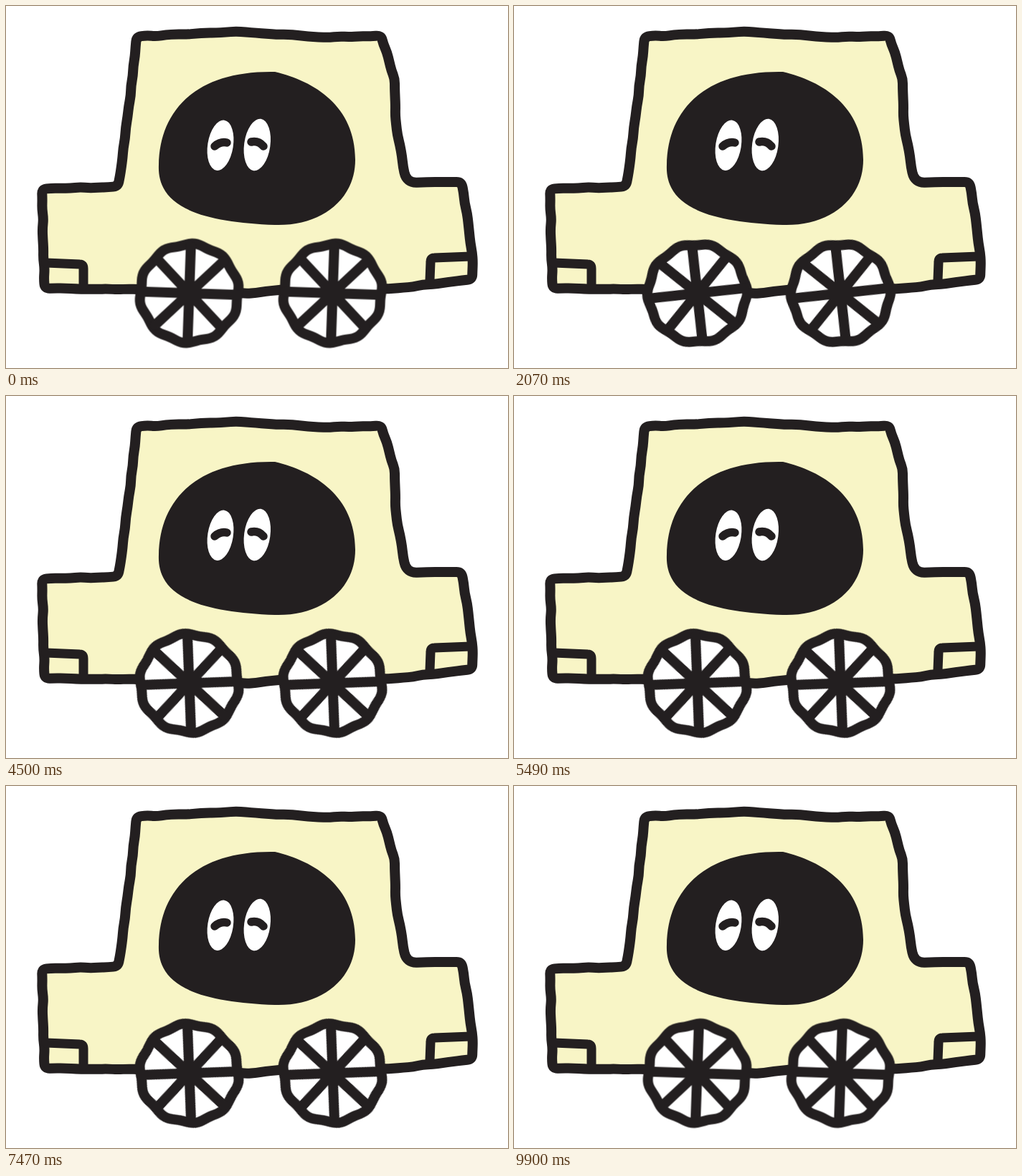
An HTML page that plays this animation: 700x506 px, repeating every 9990 ms.

```html
<!DOCTYPE html>
<html lang="en">
<head>
<meta charset="utf-8">
<title>Little car</title>
<style>
  html, body { margin: 0; width: 100%; height: 100%; overflow: hidden; background: #fff; }
  svg { display: block; width: 700px; height: 506px; }
  .line { fill: none; stroke: #231f20; stroke-width: 14; stroke-linecap: round; stroke-linejoin: round; }
  .thin { stroke-width: 13; }
  .lid { stroke-width: 11.5; }
  .body { fill: #f8f5c6; }
  .dark { fill: #231f20; }
  .white { fill: #fff; }
</style>
</head>
<body>
<svg viewBox="0 0 700 506">
  <defs>
    <g id="wheel">
      <path id="rim" class="line white"/>
      <path id="spokes" class="line"/>
    </g>
  </defs>
  <path id="car" class="line body"/>
  <path class="line thin" d="M56 359L103 361Q108 361 108 367V391M648 350L597 352Q592 352 592 358L591 383"/>
  <path class="dark" d="M213 222C214 150 260 90 375 92C430 105 487 140 487 215C487 270 440 308 375 306C280 302 210 285 213 222Z"/>
  <ellipse class="white" rx="17.8" ry="35.5" transform="translate(299 194.7) rotate(9)"/>
  <ellipse class="white" rx="18.2" ry="36.5" transform="translate(350.3 194) rotate(8)"/>
  <path class="line lid" d="M291 196Q299 189 308 191M342 190Q352 188 359 196"/>
  <g transform="translate(255.5 401.5)"><g class="spin"><use href="#wheel"/></g></g>
  <g transform="translate(455.5 401.5)"><g class="spin"><use href="#wheel"/></g></g>
</svg>
<script>
const draw = (id, d) => document.getElementById(id).setAttribute('d', d);
const mid = (a, b) => [(a[0] + b[0]) / 2, (a[1] + b[1]) / 2];

// Point at a clock bearing in degrees, 0 being straight up
const polar = (deg, r) => {
  const a = deg * Math.PI / 180;
  return [r * Math.sin(a), -r * Math.cos(a)];
};

// Closed shape that rounds every point off between its neighbours
function soft(points) {
  const n = points.length;
  const parts = points.map((p, i) => `Q${p} ${mid(p, points[(i + 1) % n])}`);
  return `M${mid(points[n - 1], points[0])}${parts.join('')}Z`;
}

let seed = 7;
const random = () => (seed = seed * 16807 % 2147483647) / 2147483647;

// Splits the edges into short pieces and shakes them like a hand-held pen
function shaky(corners, step, amount) {
  return corners.flatMap((a, i) => {
    const b = corners[(i + 1) % corners.length];
    const dx = b[0] - a[0], dy = b[1] - a[1], len = Math.hypot(dx, dy);
    const n = Math.max(1, Math.round(len / step));
    return Array.from({ length: n }, (_, k) => {
      const t = k / n, off = k ? (random() - 0.5) * amount / len : 0;
      return [a[0] + dx * t - dy * off, a[1] + dy * t + dx * off];
    });
  });
}

const corners = [
  [182, 43], [320, 35.5], [450, 44], [523, 41],
  [542, 102], [544, 165], [557, 240], [566, 247], [635, 246],
  [643, 290], [650, 345], [650, 382],
  [540, 395], [390, 396], [335, 402], [185, 396], [54, 395],
  [50, 256], [156, 252], [166, 185], [174, 125]
];
draw('car', soft(shaky(corners, 14, 2)));

const rim = Array.from({ length: 60 }, (_, i) => {
  const deg = i * 6;
  return polar(deg, 68.5 + 1.6 * Math.cos((deg - 42) * Math.PI / 18));
});
draw('rim', soft(rim));

const spokes = Array.from({ length: 8 }, (_, i) => `M0 0L${polar(2 + i * 45, 66)}`);
draw('spokes', spokes.join(''));

// Three turns back every eleven steps of 90 ms
const STEPS = 111, STEP_MS = 90, TURN = -1080 / 11;
for (const el of document.querySelectorAll('.spin')) {
  el.animate(
    [{ transform: 'rotate(0deg)' }, { transform: `rotate(${TURN * STEPS}deg)` }],
    { duration: STEPS * STEP_MS, delay: -1, iterations: Infinity, easing: `steps(${STEPS})` }
  );
}
</script>
</body>
</html>
```
